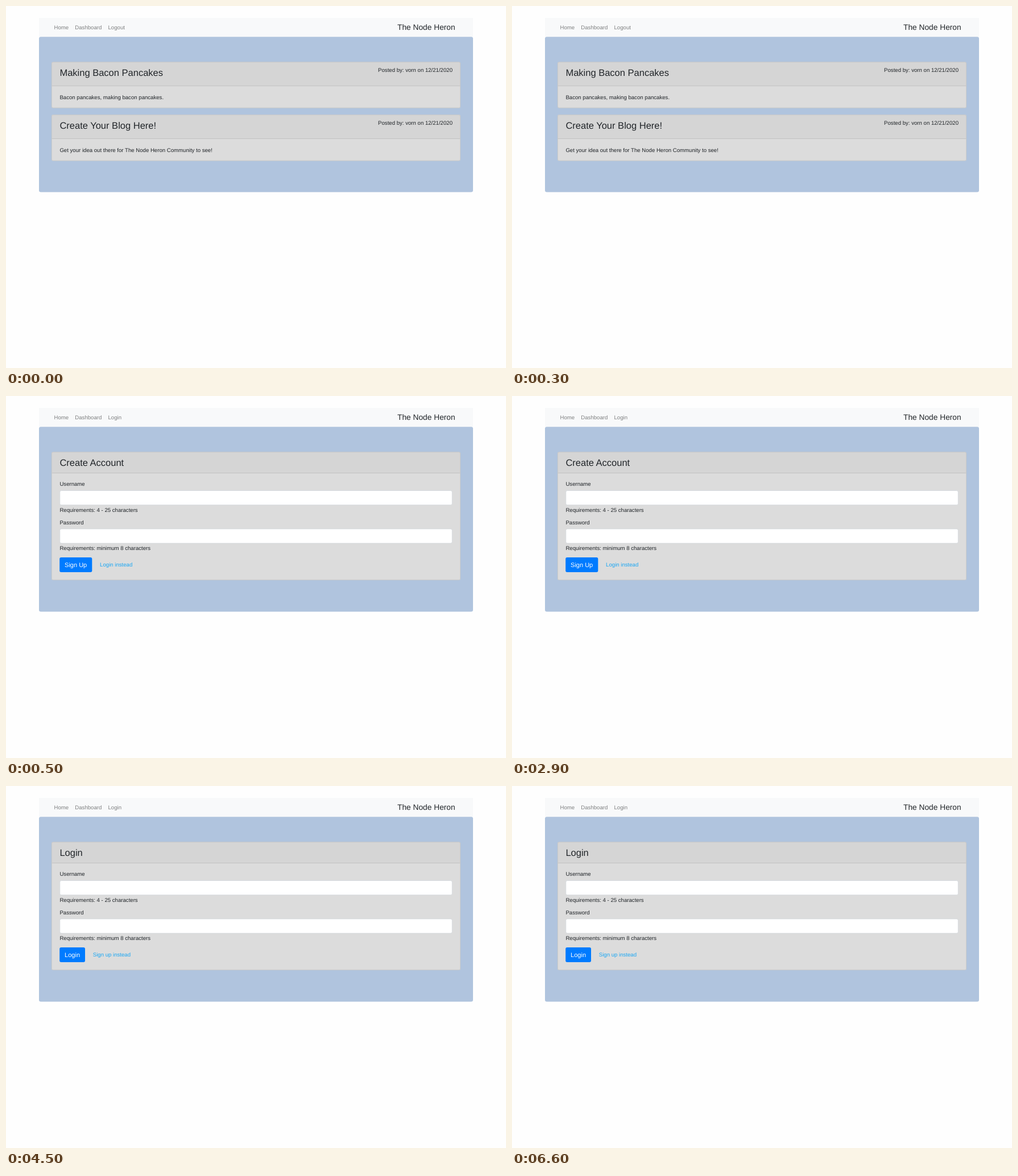
An HTML page that plays this animation: 879x637 px, repeating every 8000 ms.

```html
<!DOCTYPE html>
<html lang="en">
<head>
<meta charset="utf-8">
<title>Blog screens</title>
<style>
  html, body { margin: 0; width: 100%; height: 100%; overflow: hidden; background: #fefefe; }
  svg { display: block; width: 879px; height: 637px; }
  text {
    font: 9.625px "Liberation Sans", Arial, sans-serif;
    fill: #212529;
    text-rendering: geometricPrecision;
  }
  .nav { fill: #7f8081; }
  .brand { font-size: 13.75px; }
  .title { font-size: 16.5px; }
  .button { font-size: 11px; fill: #fff; }
  .link { fill: #1ba7f3; }
  .end { text-anchor: end; }
</style>
</head>
<body>
<svg id="stage" viewBox="0 0 879 637"></svg>
<script>
const stage = document.getElementById("stage");
const LOOP = 8000;
const BRAND = "The Node Heron";

const rect = (x, y, w, h, fill, r = 0, extra = "") =>
  `<rect x="${x}" y="${y}" width="${w}" height="${h}" rx="${r}" fill="${fill}" ${extra}/>`;

const text = (x, y, str, cls = "") =>
  `<text x="${x}" y="${y}" class="${cls}">${str}</text>`;

const page = (session, height, content) =>
  rect(58, 21, 763, 33.5, "#f8f9fa") +
  text(84.5, 41.3, "Home", "nav") +
  text(121.3, 41.3, "Dashboard", "nav") +
  text(179.5, 41.3, session, "nav") +
  text(688, 42, BRAND, "brand") +
  rect(58, 54.3, 763, height, "#b0c4de", 3.3) +
  content;

const card = (y, h, headH, title) =>
  rect(80, y, 719, h, "#dcdcdc", 2.75) +
  rect(80.4, y + 0.4, 718.2, headH, "#d5d5d5", 2.4) +
  rect(80.4, y + headH - 0.3, 718.2, 0.8, "#bebebe") +
  rect(80.35, y + 0.35, 718.3, h - 0.7, "none", 2.4, 'stroke="#c0c0c0" stroke-width=".7"') +
  text(94.4, y + 24.4, title, "title");

const post = (y, title, body) =>
  card(y, 81.2, 42.2, title) +
  text(785, y + 17.9, "Posted by: vorn on 12/21/2020", "end") +
  text(94.4, y + 65.2, body);

const field = (y, label, hint) =>
  text(94.4, y, label) +
  rect(94.75, y + 8.3, 689.5, 25.2, "#fff", 2.5, 'stroke="#ced4da" stroke-width=".7"') +
  text(94.4, y + 45.4, "Requirements: " + hint);

const form = (title, action, buttonW, link) =>
  page("Login", 325.2,
    card(98.4, 225.6, 37, title) +
    field(158.2, "Username", "4 - 25 characters") +
    field(225.6, "Password", "minimum 8 characters") +
    rect(94.2, 284, buttonW, 26.1, "#007bff", 2.75) +
    text(103.1, 300.7, action, "button") +
    text(94.2 + buttonW + 13.8, 300, link, "link"));

const screens = [
  { at: 0, markup: page("Logout", 273.3,
      post(98.4, "Making Bacon Pancakes", "Bacon pancakes, making bacon pancakes.") +
      post(191.3, "Create Your Blog Here!",
        `Get your idea out there for ${BRAND} Community to see!`)) },
  { at: 500, markup: form("Create Account", "Sign Up", 57.1, "Login instead") },
  { at: 4500, markup: form("Login", "Login", 44.8, "Sign up instead") }
];

stage.innerHTML = screens.map(s => `<g>${s.markup}</g>`).join("");
const groups = [...stage.children];

function draw(time) {
  const t = time % LOOP;
  const current = screens.findLastIndex(s => t >= s.at);
  groups.forEach((g, i) => { g.style.display = i === current ? "" : "none"; });
}

const start = performance.now();
function tick(now) {
  draw(Math.max(0, now - start));
  requestAnimationFrame(tick);
}
draw(0);
requestAnimationFrame(tick);
</script>
</body>
</html>
```
